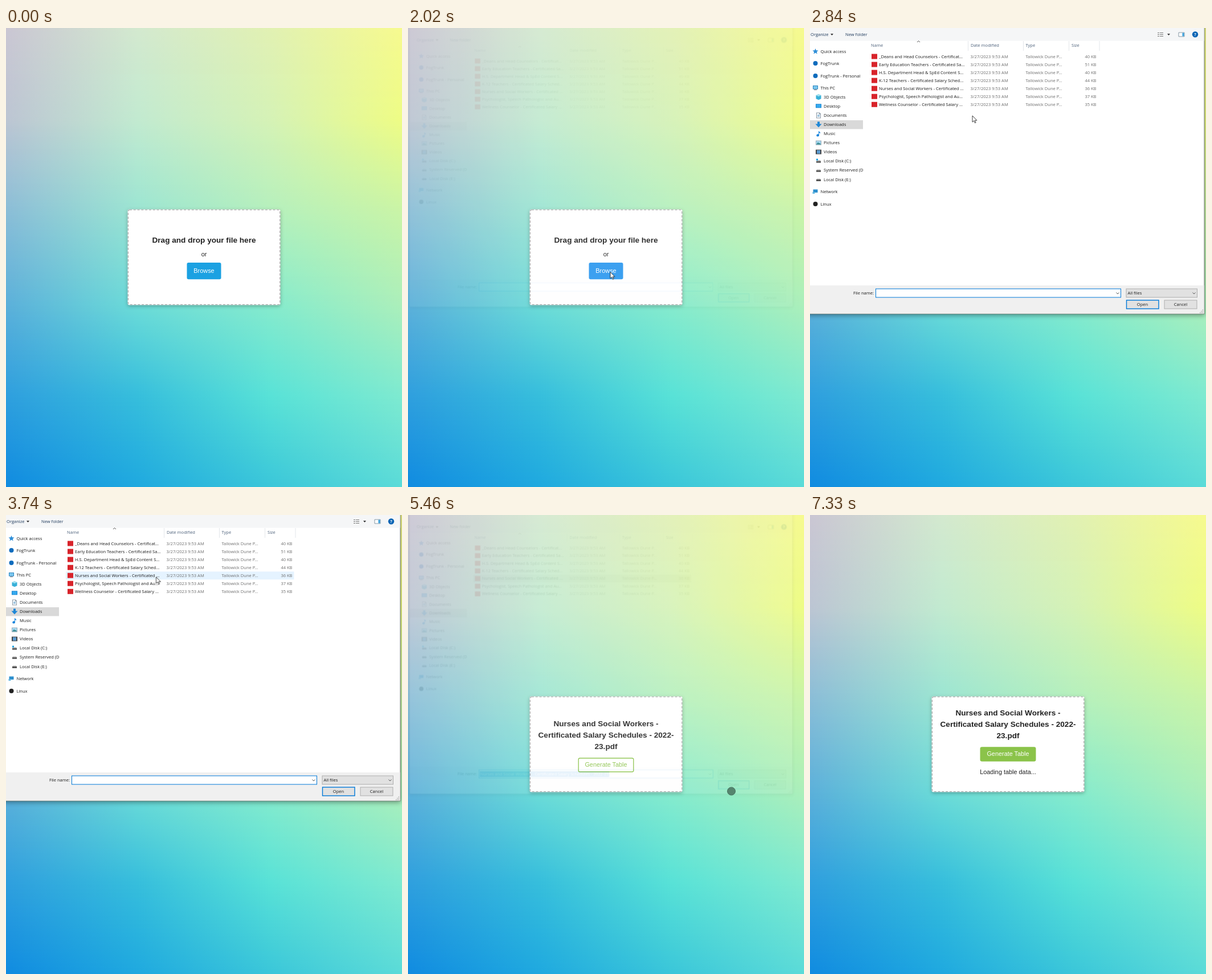
An HTML page with a canvas that plays this animation: 695x806 px, repeating every 8 s.

```html
<!DOCTYPE html>
<html lang="en">
<head>
<meta charset="utf-8">
<title>File upload</title>
<style>
html, body { margin: 0; width: 100%; height: 100%; overflow: hidden; }
canvas, svg { position: absolute; left: 0; top: 0; width: 695px; height: 806px; }
text { white-space: pre; }

.card text { font-family: "Liberation Sans", Arial, sans-serif; font-size: 10.88px; text-anchor: middle; fill: #222; }
.card .title { font-size: 13.6px; font-weight: bold; }
.card .light { fill: #fff; }
.sheet { fill: #fff; filter: drop-shadow(0 2.5px 3px rgba(0,0,0,.28)); }
.dash { fill: none; stroke: #aaa; stroke-width: 1.36; stroke-dasharray: 4.08 2.72; }

.dialog { transform-origin: 316px 226px; }
.dialog text { font-family: "Open Sans", "Noto Sans", sans-serif; font-size: 7.55px; fill: #1c1c1c; }
.dialog .tool { fill: #1e395b; }
.dialog .head { fill: #4c607a; }
.dialog .dim { fill: #6d6d6d; }
.dialog .end { text-anchor: end; }
.dialog .mid { text-anchor: middle; }
.frame { fill: #fff; stroke: #6f7a70; stroke-width: 1; filter: drop-shadow(0 2px 4px rgba(0,0,0,.4)); }
.line { fill: none; stroke: #555; stroke-width: 1; }
.ctl { fill: #e1e1e1; stroke: #adadad; }

/* one shared 8 s timeline; hard switches by default */
.dialog, .drop, .ready, .browse, .hover, .picked, .name, .mark, .caret, .open, .load, .shift, .dot, .arrow {
  animation: 8s step-end infinite;
}
.drop { animation-name: drop; }
.ready { animation-name: ready; }
.browse { animation-name: browse; }
.dialog { animation-name: dialog; }
.hover { animation-name: hover; }
.picked { animation-name: picked; }
.dialog .name { animation-name: name; }
.mark { animation-name: mark; }
.caret { animation-name: caret; }
.open { animation-name: open; }
.load { animation-name: load; }
.shift { animation-name: shift; }
.dot { animation-name: dot; }
.arrow { animation-name: arrow; }
.fill { animation: fill 8s linear infinite; }
.card .label { animation: label 8s linear infinite; }
.mouse { animation: mouse 8s ease-in-out infinite; }

@keyframes drop { 0% { opacity: 1 } 67.375%, 100% { opacity: 0 } }
@keyframes ready { 0% { opacity: 0 } 67.375%, 100% { opacity: 1 } }
@keyframes browse { 0% { fill: #1ba1e2 } 22.625%, 100% { fill: #2f9aef } }
@keyframes dialog {
  0% { opacity: 0; transform: scale(.955) }
  25.25% { opacity: .07; transform: scale(.955) }
  26.125% { opacity: .45; transform: scale(.975) }
  27% { opacity: .79; transform: scale(.99) }
  27.875% { opacity: 1; transform: none }
  67.375% { opacity: .5; transform: scale(.98) }
  68.25% { opacity: .1; transform: scale(.955) }
  69.125%, 100% { opacity: 0; transform: scale(.955) }
}
@keyframes hover {
  0% { opacity: 0; transform: translateY(28px) }
  40.6% { opacity: 1; transform: translateY(28px) }
  42.4% { opacity: 1; transform: translateY(14px) }
  44.6% { opacity: 1; transform: none }
  48.375%, 100% { opacity: 0; transform: none }
}
@keyframes picked {
  0% { opacity: 0; fill: #cce8ff }
  48.375% { opacity: 1; fill: #cce8ff }
  65.625%, 100% { opacity: 1; fill: #d9d9d9 }
}
@keyframes name {
  0% { opacity: 0; fill: #1c1c1c }
  48.375% { opacity: 1; fill: #1c1c1c }
  65.625%, 100% { opacity: 1; fill: #fff }
}
@keyframes mark { 0% { opacity: 0 } 65.625%, 100% { opacity: 1 } }
@keyframes caret { 0% { opacity: 0 } 26% { opacity: 1 } 32.75% { opacity: 0 } 39.4% { opacity: 1 } 46%, 100% { opacity: 0 } }
@keyframes open { 0% { fill: #e1e1e1 } 62.4%, 100% { fill: #cce4f7 } }
@keyframes fill { 0%, 88.25% { fill-opacity: 0 } 90.75%, 100% { fill-opacity: 1 } }
@keyframes label { 0%, 88.25% { fill: #8bc34a } 90.75%, 100% { fill: #fff } }
@keyframes shift { 0% { transform: none } 89.125%, 100% { transform: translateY(-19px) } }
@keyframes load { 0% { opacity: 0 } 89.125%, 100% { opacity: 1 } }
@keyframes dot { 0% { opacity: 0 } 67.375% { opacity: 1 } 69.125%, 100% { opacity: 0 } }
@keyframes arrow { 0% { opacity: 0 } .75% { opacity: 1 } 67.375% { opacity: 0 } 69.125% { opacity: 1 } 88.25%, 100% { opacity: 0 } }
@keyframes mouse {
  0%, .6% { transform: translate(693px, 604px) }
  10%, 10.7% { transform: translate(502px, 520px) }
  10.875%, 13.5% { transform: translate(509px, 523px) }
  20.125%, 22% { transform: translate(348px, 422px) }
  22.7%, 28% { transform: translate(355px, 428.5px) }
  32% { transform: translate(329px, 400px) }
  35.5%, 37.1% { transform: translate(285px, 154px) }
  46.75%, 49.5% { transform: translate(263.5px, 109px) }
  57.875% { transform: translate(538px, 460px) }
  65%, 69.1% { transform: translate(568px, 485px) }
  74%, 75.6% { transform: translate(392px, 408px) }
  79.125%, 83.25% { transform: translate(368px, 425px) }
  85%, 100% { transform: translate(361px, 440px) }
}
</style>
</head>
<body>
<canvas id="sky" width="695" height="806"></canvas>
<svg viewBox="0 0 695 806">
  <g class="card">
    <rect class="sheet" x="213.5" y="318.5" width="268" height="168" rx="3"/>
    <rect class="dash" x="214.4" y="319.4" width="266.4" height="166.2" rx="2.5"/>
    <g class="drop">
      <text class="title" x="347.5" y="377.3">Drag and drop your file here</text>
      <text x="347.5" y="400.6">or</text>
      <rect class="browse" x="317.5" y="412" width="60" height="29.3" rx="2.8"/>
      <text class="light" x="347.5" y="430.3">Browse</text>
    </g>
    <g class="ready">
      <g class="shift">
        <text class="title" x="347.5" y="370.6">Nurses and Social Workers -</text>
        <text class="title" x="347.5" y="390.7">Certificated Salary Schedules - 2022-</text>
        <text class="title" x="347.5" y="410.8">23.pdf</text>
        <rect class="fill" x="299.2" y="427" width="96.6" height="24" rx="2.6" fill="#8bc34a" stroke="#8bc34a" stroke-width="1.36"/>
        <text class="label" x="347.5" y="442.4">Generate Table</text>
      </g>
      <text class="load" x="347.5" y="455">Loading table data...</text>
    </g>
  </g>
  <g class="dialog">
    <rect class="frame" x="-12" y="-42" width="704" height="544"/>
    <path d="M-11.5-41.5h703V22.5h-703z" fill="#f5f6f7"/>
    <path d="M-11.5 452h703v49.5h-703z" fill="#f0f0f0"/>
    <path d="M-11.5 162h104.5v15.6h-104.5z" fill="#d9d9d9"/>
    <path d="M277.5 23v17M374.5 23v17M454.5 23v17M508 23v17" stroke="#e3e6ea"/>
    <path class="line" d="M188 25l2.5-2.5 2.5 2.5" stroke-width=".8"/>
    <path d="M36 10h5l-2.5 3zM627 10h5l-2.5 3z" fill="#333"/>
    <path d="M610 8.5h3m1 0h6m-10 3h3m1 0h6m-10 3h3m1 0h6" stroke="#777"/>
    <path d="M647 8h10v7h-10z" fill="#fff" stroke="#6a8090" stroke-width=".8"/>
    <path d="M653.5 8.5h3v6h-3z" fill="#3ba0dc"/>
    <circle cx="676" cy="11.3" r="5.2" fill="#0a64b4"/>
    <text x="676" y="14.1" class="mid" style="fill:#fff;font-weight:bold">?</text>
    <rect class="hover" x="105" y="99.3" width="400.5" height="14" fill="#e5f3ff"/>
    <rect class="picked" x="105" y="99.3" width="400.5" height="14"/>
    <g id="list"></g>
    <rect x="115.5" y="458" width="430" height="15" fill="#fff" stroke="#0078d7"/>
    <rect class="mark" x="117" y="460.5" width="238" height="10.5" fill="#0078d7"/>
    <text class="name" x="118" y="468.3">Nurses and Social Workers - Certificated Salary Schedules - 2022-23</text>
    <path class="caret" d="M118.5 460.5v10.5" stroke="#111" stroke-width=".8"/>
    <rect class="ctl" x="555" y="458" width="124.5" height="15"/>
    <path class="line" d="M537.5 464.5l2.5 2.5 2.5-2.5M671.5 464.5l2.5 2.5 2.5-2.5" stroke-width=".9"/>
    <rect class="open" x="555.5" y="478" width="56.5" height="15" stroke="#0078d7" stroke-width="1.4"/>
    <rect class="ctl" x="622" y="478" width="57" height="15"/>
    <path d="M684 500h1.3m1-2.5h1.3m-1.3 2.5h1.3m1-5h1.3m-1.3 2.5h1.3m-1.3 2.5h1.3" stroke="#aaa" stroke-width="1.3"/>
    <g id="labels"></g>
  </g>
  <g class="mouse">
    <circle class="dot" cx="-.5" cy="0" r="7" fill="#466e5a" fill-opacity=".82" stroke="#4a7562" stroke-width="1"/>
    <path class="arrow" d="M0 0v11.2l2.6-2.4 1.8 4 1.7-.8-1.8-3.8h3.6z" fill="#fff" stroke="#111" stroke-width=".8"/>
  </g>
</svg>
<script>
// Backdrop: colours at a few points, blended both ways
const sky = [
  'cac6d3 d3e9cf e1f1b3 f6fa8f', 'bcc5d3 c2ead0 d5f2b6 eefc85',
  '8abdd7 9be5d2 b5f0bd c9f4a7', '5cb0da 6cdcd8 86ebcd acefba',
  '2f9fde 36bedc 58e2d7 7eead0', '108be0 1fa9df 3ac6d9 5adbd8'
].map(row => row.split(' ').map(hex => [0, 2, 4].map(i => parseInt(hex.substr(i, 2), 16))));
const ctx = document.getElementById('sky').getContext('2d');
for (let y = 0; y < 806; y++) {
  const v = y / 806 * 5, r = Math.floor(v), f = v - r;
  const grad = ctx.createLinearGradient(0, 0, 695, 0);
  sky[r].forEach((a, k) => {
    const c = a.map((n, i) => Math.round(n + (sky[r + 1][k][i] - n) * f));
    grad.addColorStop(k / 3, `rgb(${c})`);
  });
  ctx.fillStyle = grad;
  ctx.fillRect(0, y, 695, 1);
}

const text = (s, x, y, cls = '') => `<text class="${cls}" x="${x}" y="${y + 2.6}">${s}</text>`;
const shape = (d, fill) => `<path d="${d}" fill="${fill}"/>`;
const disk = shape('M-4 0h8v3h-8z', '#555') + shape('M-4 0l1-1.5h6l1 1.5z', '#bbb');
const screen = shape('M-4.5-4h9v6.5h-9z', '#2a86c0') + shape('M-3.5-3h7v4.5h-7z', '#7cc8f0') + shape('M-2.5 3h5v1h-5z', '#567');
const icons = {
  star: shape('M0-5l1.4 3.3 3.6.3-2.7 2.4.8 3.5L0 2.6l-3.1 1.9.8-3.5L-5-1.4l3.6-.3z', '#2f8fd8'),
  round: '<circle r="4" fill="#0f6cbd"/>',
  pc: screen,
  cube: shape('M0-5l4.5 2v6L0 5l-4.5-2v-6z', '#38b0d8') + shape('M0-5l4.5 2L0-1l-4.5-2z', '#a0e0f0'),
  desk: shape('M-5-4H5v7H-5z', '#1a86d0') + shape('M-4-3h8v5h-8z', '#35aaf0'),
  doc: shape('M-4-5h6l2 2v8h-8z', '#8a98a5') + shape('M-3-4h4v2h2v6h-6z', '#fff') + shape('M-2-1h4v1h-4zM-2 1h4v1h-4z', '#4a90c0'),
  down: shape('M-2-5h4v4h3.5L0 5-5.5-1H-2z', '#1f87d6'),
  note: shape('M0-5c1 2 4 2 3 5-.5-1.5-1.500-1.500-2-1.500V3a2.300 2 0 1 1-1-1.700z', '#1583dc'),
  photo: shape('M-5-4H5v8H-5z', '#9aaab5') + shape('M-4-3h8v6h-8z', '#a8dcf5') + shape('M-4 3l3-4 2 2 1-1 2 3z', '#3a8a90'),
  film: shape('M-5-4H5v8H-5z', '#444') + shape('M-3-3h6v6h-6z', '#5a9ad0'),
  disk,
  main: disk + shape('M-4-4h3v3h-3z', '#18a0e0'),
  net: shape('M-4-3.500h8v5.500h-8z', '#2c8fce') + shape('M-5 1h4v3h-4z', '#64b8e0'),
  dark: '<circle r="4" fill="#222"/>'
};
const places = [
  ['star', 'Quick access', 41], ['round', 'FogTrunk', 62], ['round', 'FogTrunk - Personal', 84], ['pc', 'This PC', 105],
  ['cube', '3D Objects', 121.3, 1], ['desk', 'Desktop', 137.3, 1], ['doc', 'Documents', 153.4, 1], ['down', 'Downloads', 169.5, 1],
  ['note', 'Music', 185.5, 1], ['photo', 'Pictures', 201.6, 1], ['film', 'Videos', 217.6, 1], ['main', 'Local Disk (C:)', 233.6, 1],
  ['disk', 'System Reserved (D', 249.7, 1], ['disk', 'Local Disk (E:)', 266, 1], ['net', 'Network', 287], ['dark', 'Linux', 309]
];
const files = [
  ['_Deans and Head Counselors - Certificat...', 40], ['Early Education Teachers - Certificated Sa...', 51],
  ['H.S. Department Head &amp; SpEd Content S...', 40], ['K-12 Teachers - Certificated Salary Sched...', 44],
  ['Nurses and Social Workers - Certificated ...', 36], ['Psychologist, Speech Pathologist and Au...', 37],
  ['Wellness Counselor - Certificated Salary ...', 35]
];
const side = places.map(([icon, name, y, deep]) =>
  `<g transform="translate(${deep ? 15 : 9.5} ${y})">${icons[icon]}</g>` + text(name, deep ? 24 : 18.5, y));
const rows = files.map(([name, kb], i) => {
  const y = 50 + i * 14.05;
  return `<rect x="108" y="${y - 4.5}" width="10" height="9" fill="#d8232a"/>` + text(name, 121, y) +
    text('3/27/2023 9:53 AM', 281.5, y, 'dim') + text('Tallowick Dune P...', 378.5, y, 'dim') + text(kb + ' KB', 502.5, y, 'dim end');
});
document.getElementById('list').innerHTML = side.join('') + rows.join('');
document.getElementById('labels').innerHTML =
  text('Organize', 1, 11.3, 'tool') + text('New folder', 62, 11.3, 'tool') +
  [['Name', 107], ['Date modified', 282], ['Type', 378.5], ['Size', 459]].map(([s, x]) => text(s, x, 30.5, 'head')).join('') +
  text('File name:', 112, 465.3, 'end') + text('All files', 557.5, 465.3) +
  text('Open', 583.5, 485.6, 'mid') + text('Cancel', 650.5, 485.6, 'mid');
</script>
</body>
</html>
```
